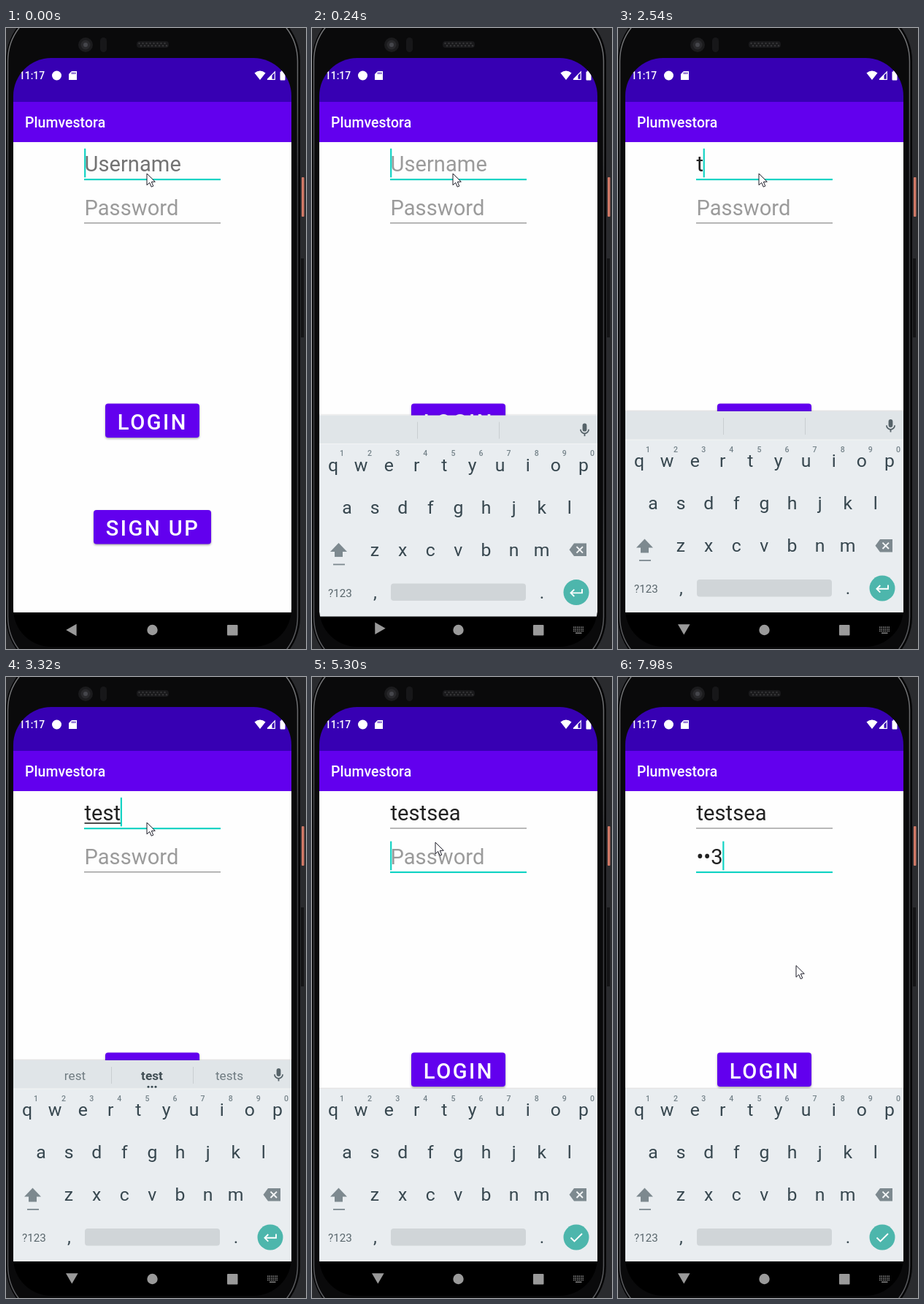
Write an HTML page with a canvas that moves like this. It is 411x849 px and loops after 8000 ms.

```html
<!DOCTYPE html>
<html lang="en">
<head>
<meta charset="utf-8">
<title>Login screen</title>
<style>
html, body { margin: 0; width: 100%; height: 100%; overflow: hidden; background: #2b2c2f; }
canvas { display: block; width: 411px; height: 849px; }
</style>
</head>
<body>
<canvas id="stage"></canvas>
<script>
const W = 411, H = 849, LOOP = 8000, STEP = 120;
const canvas = document.getElementById('stage');
const dpr = window.devicePixelRatio || 1;
canvas.width = W * dpr;
canvas.height = H * dpr;
const c = canvas.getContext('2d');

const TEAL = '#13d3c4', PURPLE = '#6200ee', INK = '#212121', KEY = '#37474f';
const KEYICON = '#7d898f', NAV = '#9a9a9a', FIELD = 29.1, PITCH = 38.1;

// Timeline in ms
const USER = 'testsea', USER_KEYS = [2540, 2810, 2930, 3200, 3880, 4150, 4270];
const PASS = '123', PASS_KEYS = [5850, 6240, 6550];
const PASS_FOCUS = 5180;
const LEFT = ['the', 'the', 'the', 'rest', 'rests', 'testaceous', 'restaff'];
const RIGHT = ['to', 'tea', 'tests', 'tests', 'Tests', 'tests', 'testaceous'];
const LEGS = [
  { from: 4680, to: 5160, x: 169, y: 225.5 },
  { from: 5760, to: 6240, x: 205, y: 276 },
  { from: 6840, to: 7080, x: 241, y: 396 },
  { from: 7800, to: 7920, x: 244, y: 394 }
];

const clamp = v => Math.min(1, Math.max(0, v));
const ease = p => 1 - (1 - p) ** 3;
const hold = t => Math.floor(t / STEP) * STEP;
const typed = (keys, t) => keys.filter(k => k <= t).length;

function pointerAt(t) {
  let x = 193, y = 198.5;
  for (const leg of LEGS) {
    const k = ease(clamp((t - leg.from) / (leg.to - leg.from)));
    x += (leg.x - x) * k;
    y += (leg.y - y) * k;
  }
  return [x, y];
}

// The caret blinks after the last event, but stays lit while a word is composed.
function caretAt(t) {
  if (t >= USER_KEYS[0] && t < PASS_FOCUS) return true;
  const last = Math.max(...[0, PASS_FOCUS, ...PASS_KEYS].filter(e => e <= t));
  return t - last < 60 || (t - last - 60) % 960 < 480;
}

function rect(x, y, w, h, fill) {
  c.fillStyle = fill;
  c.fillRect(x, y, w, h);
}

function round(x, y, w, h, r, fill) {
  c.beginPath();
  c.roundRect(x, y, w, h, r);
  c.fillStyle = fill;
  c.fill();
}

function disc(x, y, r, fill) {
  round(x - r, y - r, 2 * r, 2 * r, r, fill);
}

function path(points, close) {
  c.beginPath();
  points.forEach(([x, y]) => c.lineTo(x, y));
  if (close) c.closePath();
}

function poly(points, fill) {
  path(points, true);
  c.fillStyle = fill;
  c.fill();
}

function line(points, color, width) {
  path(points);
  c.strokeStyle = color;
  c.lineWidth = width;
  c.stroke();
}

function text(s, x, y, size, fill, { weight = 400, align = 'left', gap = 0 } = {}) {
  c.font = `${weight} ${size}px Roboto, sans-serif`;
  c.letterSpacing = gap + 'px';
  c.textAlign = align;
  c.fillStyle = fill;
  c.fillText(s, x, y);
  return c.measureText(s).width;
}

function phone() {
  rect(0, 0, W, H, '#2a2b2e');
  round(405, 204, 3.5, 54, 1, '#cf7866');
  rect(404, 315, 4, 108, '#141416');
  round(0, -32, 403, 914, 77, '#050506');
  round(2, -30, 398, 910, 75, '#0a0a0b');
  const rim = c.createLinearGradient(0, 0, 0, H);
  ['#77787a', '#3c3d40', '#3c3d40', '#3c3d40', '#5c5d60'].forEach((s, i) => rim.addColorStop(i / 4, s));
  c.lineWidth = 1.5;
  c.strokeStyle = rim;
  c.beginPath();
  c.roundRect(2.5, -29.5, 397, 909, 75);
  c.stroke();
  disc(109, 23, 10, '#1b1b1d');
  disc(109, 23, 6.5, '#29292c');
  disc(109, 23, 3, '#45464b');
  round(129, 13, 9, 20, 4.5, '#171719');
  round(179, 18, 44, 9, 4, '#19191b');
  for (let i = 0; i < 16; i++) disc(182.5 + i * 2.5, i % 2 ? 24.3 : 21, 1.2, '#363638');
}

function statusBar() {
  text('11:17', 18, 70, 13.8, '#fff', { weight: 500 });
  disc(69.5, 65, 6.5, '#fff');
  poly([[90, 59], [97, 59], [97, 71], [86, 71], [86, 63]], '#fff');
  for (let i = 0; i < 3; i++) rect(90 + i * 2.1, 60.5, 1.1, 2.6, '#3700b3');
  c.beginPath();
  c.moveTo(348, 71);
  c.lineTo(340.5, 61.5);
  c.quadraticCurveTo(348, 55.5, 355.5, 61.5);
  c.fillStyle = '#fff';
  c.fill();
  line([[358, 70.3], [368.3, 70.3], [368.3, 60], [358, 70.3]], '#fff', 1.2);
  poly([[358, 70.5], [364.5, 64], [364.5, 70.5]], '#fff');
  round(375.5, 59.5, 7, 12, 1, '#fff');
  rect(377.3, 58, 3.4, 2, '#fff');
}

function button(label, y, w) {
  const x = 200.5 - w / 2;
  c.save();
  c.shadowColor = 'rgba(0,0,0,.35)';
  c.shadowBlur = 3 * dpr;
  c.shadowOffsetY = 1.5 * dpr;
  round(x, y, w, 46.5, 4, PURPLE);
  c.restore();
  text(label, x + 16.8, y + 35.4, FIELD, '#fff', { weight: 500, gap: 2.5 });
}

function field(y, value, hint, { focus, pressed, composing, caret }) {
  const x = 107.5;
  const color = value ? INK : pressed ? '#737373' : '#9b9b9b';
  const shown = text(value || hint, x, y, FIELD, color, { gap: .05 });
  const width = value ? shown : 0;
  if (focus) rect(107, y + 10, 187, 2.2, TEAL);
  else rect(107, y + 10.2, 187, 1.2, '#8c8c8c');
  if (composing) rect(x, y + 3, width, 1.6, INK);
  if (focus && caret) rect(x + width - .4, y - 31.2, 2.2, 39.5, TEAL);
}

function mic(x, y) {
  const color = '#566369';
  round(x - 2.9, y - 9, 5.8, 11, 2.9, color);
  c.strokeStyle = color;
  c.lineWidth = 1.7;
  c.beginPath();
  c.arc(x, y - .8, 5.6, 0, Math.PI);
  c.stroke();
  rect(x - .9, y + 4.5, 1.8, 4, color);
}

function strip(n) {
  rect(10, 524, 381, 39, '#e0e5e8');
  rect(10, 562.5, 381, 1, '#f3f5f6');
  for (const x of [144, 256]) rect(x, 533, 1, 23, '#c9ced1');
  mic(373.5, 544);
  if (!n) return;
  const word = (s, x, fill, weight) => text(s, x, 551, 17.2, fill, { weight, align: 'center' });
  word(LEFT[n - 1], 94.5, '#6f7b81', 400);
  word(USER.slice(0, n), 200, '#414e54', n === 4 || n === 5 ? 700 : 400);
  word(RIGHT[n - 1], 306, '#6f7b81', 400);
  for (let i = -1; i < 2; i++) disc(200 + i * 5, 560.2, 1.5, KEY);
}

function keys(done) {
  rect(10, 563, 381, 236, '#e9edf0');
  const row = (letters, x, y, size = 24.8, color = KEY, weight = 400) =>
    [...letters].forEach((s, i) => text(s, x + i * PITCH, y, size, color, { weight, align: 'center' }));
  row('qwertyuiop', 29, 600);
  row('asdfghjkl', 48, 658);
  row('zxcvbnm', 86, 716);
  row('1234567890', 41, 579.5, 10.6, '#75838a', 500);

  poly([[36.5, 698.5], [48, 710.5], [25, 710.5]], KEYICON);
  rect(31, 710, 11, 7.5, KEYICON);
  rect(29, 727, 16, 1.8, KEYICON);
  poly([[359, 699], [376, 699], [376, 716.5], [359, 716.5], [352.5, 707.8]], KEYICON);
  for (const s of [-1, 1])
    line([[362.5, 707.8 - 4.2 * s], [371, 707.8 + 4.2 * s]], '#f4f6f7', 1.9);

  row('?123', 38.5, 772, 0);
  text('?123', 38.5, 772, 15.2, '#59666c', { align: 'center' });
  text(',', 86.5, 774, 24.8, KEY, { align: 'center' });
  text('.', 315, 774, 24.8, KEY, { align: 'center' });
  round(108, 754, 185, 23.5, 4, '#d0d5d8');
  disc(362, 766, 17.5, '#4db6ac');
  if (done) {
    line([[354.5, 766.5], [359.5, 771.5], [370, 761]], '#fff', 1.9);
  } else {
    line([[370, 761.5], [370, 766.8], [355, 766.8]], '#fff', 1.9);
    line([[359.3, 762], [354.5, 766.8], [359.3, 771.6]], '#fff', 1.9);
  }
}

function navIcons(p) {
  c.save();
  c.translate(90.3, 823 - 1.5 * p);
  c.rotate(-p * Math.PI / 2);
  poly([[-8, 0], [6.3, -8.3], [6.3, 8.3]], NAV);
  c.restore();
  disc(200.5, 823, 7.2, NAV);
  round(303, 816, 14.5, 14.5, 1, NAV);
  if (!p) return;
  for (let i = 0; i < 18; i++)
    rect(358 + i % 6 * 2.5, 818.5 + Math.floor(i / 6) * 2.6, 1.5, 1.5, '#8d8d8d');
  rect(361, 826.5, 8.5, 1.4, '#8d8d8d');
}

function pointer([x, y]) {
  c.save();
  c.translate(x, y + .5);
  path([[0, 0], [0, 15.8], [3.7, 12.4], [6.2, 18.2], [8.8, 17.1], [6.3, 11.4], [11.3, 11.2]], true);
  c.fillStyle = '#fff';
  c.fill();
  c.strokeStyle = '#1c1c28';
  c.lineWidth = 1;
  c.lineJoin = 'round';
  c.stroke();
  c.restore();
}

function softKeyboard(t, p) {
  const hasStrip = t < PASS_FOCUS + STEP;
  const top = hasStrip ? 524 : 563;
  c.save();
  c.globalAlpha = clamp(p * 1.8);
  c.translate(0, 150 * (1 - ease(p)));
  rect(10, top - 2, 381, 1, 'rgba(0,0,0,.04)');
  rect(10, top - 1, 381, 1, 'rgba(0,0,0,.1)');
  keys(!hasStrip);
  if (hasStrip) strip(t < PASS_FOCUS ? typed(USER_KEYS, t - STEP) : 0);
  c.restore();
}

function draw(t) {
  c.setTransform(dpr, 0, 0, dpr, 0, 0);
  phone();

  c.save();
  c.beginPath();
  c.roundRect(10, 41, 381, 805, 52);
  c.clip();
  rect(10, 41, 381, 60, '#3700b3');
  rect(10, 101, 381, 55, PURPLE);
  rect(10, 156, 381, 643, '#fefefe');
  rect(10, 799, 381, 47, '#000');
  statusBar();
  text('Plumvestora', 26, 136, 19.4, '#fff', { weight: 500, gap: .1 });

  const onPass = t >= PASS_FOCUS, caret = caretAt(t);
  const n = typed(PASS_KEYS, t);
  field(196, USER.slice(0, typed(USER_KEYS, t)), 'Username', {
    focus: !onPass, pressed: t < STEP, composing: !onPass && t >= USER_KEYS[0] + STEP, caret
  });
  field(255.8, n ? '•'.repeat(n - 1) + PASS[n - 1] : '', 'Password', {
    focus: onPass, pressed: onPass && t < PASS_FOCUS + STEP, caret
  });
  button('LOGIN', 513.5, 129);
  button('SIGN UP', 659, 161);

  const p = clamp(hold(t) / 360);
  if (p) softKeyboard(t, p);
  navIcons(p);
  c.restore();
  pointer(pointerAt(hold(t)));
}

const start = performance.now();
function tick() {
  draw((performance.now() - start) % LOOP);
  requestAnimationFrame(tick);
}
tick();
</script>
</body>
</html>
```
